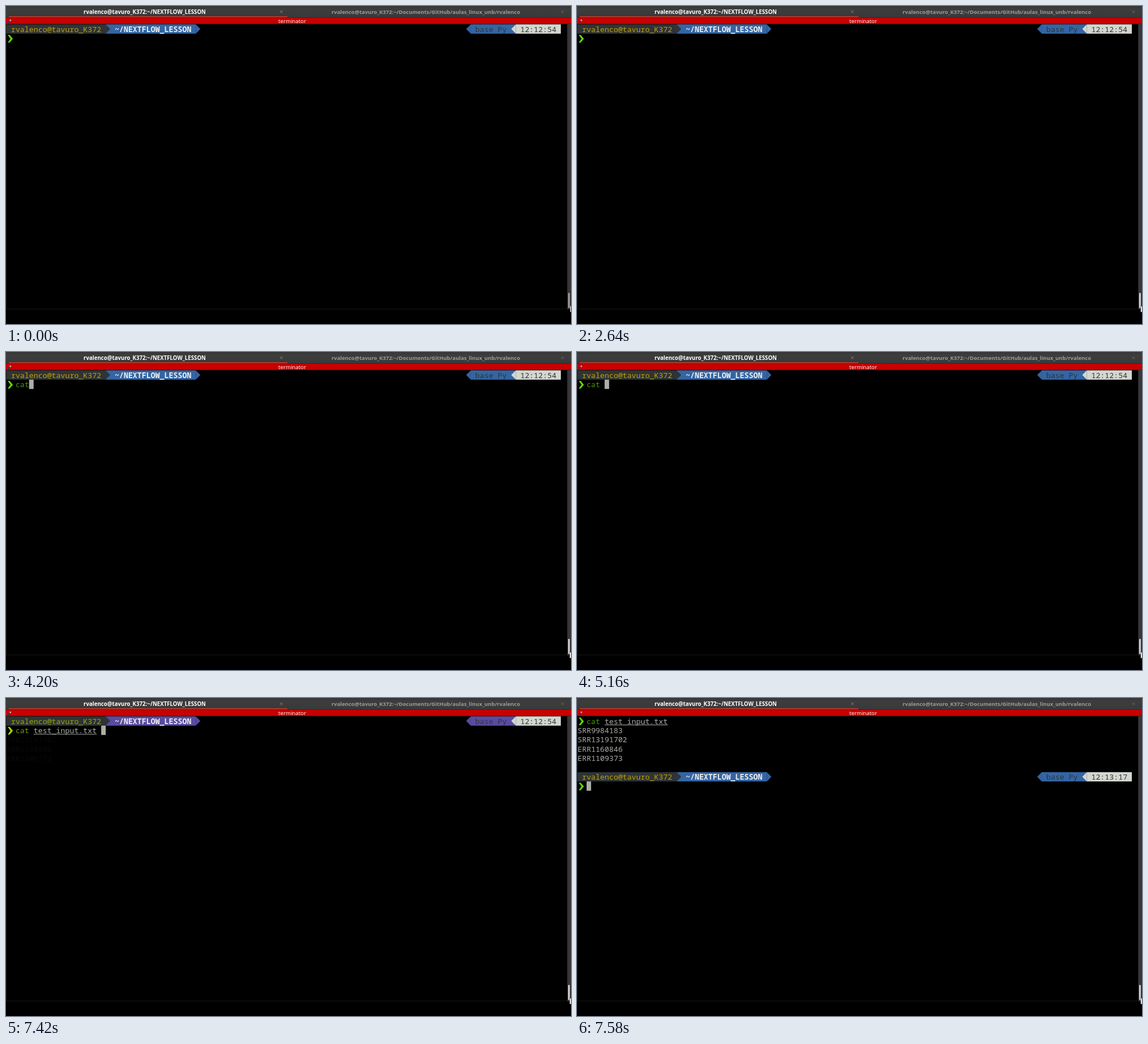
Animation, 998 px wide and 561 px high, one loop 8 s. Source, as an HTML page:

```html
<!DOCTYPE html>
<html lang="en">
<head>
<meta charset="utf-8">
<title>Terminal session</title>
<style>
html, body { margin: 0; width: 100%; height: 100%; overflow: hidden; background: #000; }
svg { display: block; width: 998px; height: 561px; }
text { white-space: pre; }
.mono { font: 13.27px "Noto Sans Mono", monospace; }
.ui { font: 9.7px "Open Sans", "Noto Sans", sans-serif; text-anchor: middle; }
.bold { font-weight: 700; }
</style>
</head>
<body>
<svg viewBox="0 0 998 561">
  <defs>
    <linearGradient id="bar" x2="0" y2="1">
      <stop offset="0" stop-color="#353535"/>
      <stop offset=".25" stop-color="#3d3d3d"/>
      <stop offset="1" stop-color="#393939"/>
    </linearGradient>
  </defs>
  <rect width="998" height="561"/>
  <rect width="998" height="20.5" fill="url(#bar)"/>
  <rect x="5" y="18.2" width="492" height="1.6" fill="#d8382c"/>
  <text class="ui bold" x="245" y="13.5" fill="#fff" id="tab1"></text>
  <text class="ui bold" x="741.5" y="13.5" fill="#9c9c9c" style="font-size:9.45px" id="tab2"></text>
  <path d="M484.2 8l4.4 4.4m0-4.4l-4.4 4.4" stroke="#858585"/>
  <path d="M980.8 8l4.4 4.4m0-4.4l-4.4 4.4" stroke="#666"/>
  <rect y="20.5" width="998" height="11.2" fill="#c80000"/>
  <rect x="3" y="26.5" width="3.2" height="3" fill="#203a60"/>
  <rect x="6.5" y="24" width="2.5" height="2.5" fill="#b8bcc8"/>
  <text class="ui" x="505.5" y="29.6" fill="#fff">terminator</text>
  <path d="M.5 32V534.5H991" fill="none" stroke="#17170a"/>
  <rect x="991.3" y="32" width="6.7" height="503" fill="#37373a"/>
  <rect id="thumb" x="993" y="506" width="2.8" height="27" rx="1.4"/>
  <path id="mouse" d="M996.5 528L999 531V540H996.5Z" fill="#fff" stroke="#111" stroke-width=".5"/>
  <g id="screen"></g>
</svg>
<script>
const LOOP = 8000, CELL = 7.96, ROW = 16.4, LEFT = 1, TOP = 32.4;
const USER = 'rvalenco', HOST = 'tavuro_K372', DIR = '~/NEXTFLOW_LESSON';
const GREY = '#acaea8', GREEN = '#4e9a06', RED = '#ef2929', DARK = '#2e3436';
const FILE = 'test_input.txt';
const IDS = ['SRR9984183', 'SRR13191702', 'ERR1160846', 'ERR1109373'];

const el = id => document.getElementById(id);
const colX = c => LEFT + c * CELL;
const rowY = r => TOP + r * ROW;

el('tab1').textContent = `${USER}@${HOST}:${DIR}`;
el('tab2').textContent = `${USER}@${HOST}:~/Documents/GitHub/aulas_linux_unb/${USER}`;

const text = (c, r, s, fill, bold) =>
  `<text class="mono${bold ? ' bold' : ''}" x="${colX(c)}" y="${rowY(r) + 13.1}" fill="${fill}">${s}</text>`;
const block = (c, r, n, fill) =>
  `<rect x="${colX(c)}" y="${rowY(r)}" width="${n * CELL}" height="${ROW}" fill="${fill}"/>`;
const cursor = (c, r) => block(c, r, 1, GREY);

// Powerline tip in one cell: dir 1 points right, -1 points left
function tip(c, r, dir, fill) {
  const base = colX(dir > 0 ? c : c + 1);
  return `<path d="M${base} ${rowY(r)}l${dir * CELL} ${ROW / 2}l${-dir * CELL} ${ROW / 2}z" fill="${fill}"/>`;
}

const caret = (r, fill = '#5fd700') =>
  `<path d="M3 ${rowY(r) + 2.2}h3.6l5.6 6.7l-5.6 6.7h-3.6l4.9-6.7z" fill="${fill}"/>`;

function header(r, clock, shifted) {
  const blue = shifted ? '#5a4ba0' : '#3465a4';
  return block(0, r, 22, DARK) + block(22, r, 20, blue) + tip(22, r, 1, DARK) + tip(42, r, 1, blue) +
    text(1, r, `${USER}@${HOST}`, shifted ? '#98a800' : '#c4a000') +
    text(24, r, DIR, '#eeeeec', true) +
    tip(102, r, -1, blue) + block(103, r, 10, blue) + text(104, r, 'base Py', DARK) +
    tip(112, r, -1, '#d3d7cf') + block(113, r, 10, '#d3d7cf') + text(114, r, clock, DARK);
}

function command(r, cmd, arg, shifted) {
  const known = cmd === 'cat';
  const color = known ? (shifted ? '#6f9d06' : GREEN) : RED;
  let out = caret(r, shifted ? '#9bd800' : undefined) + text(2, r, cmd, color, !known);
  if (arg) {
    out += text(6, r, arg, GREY) +
      `<rect x="${colX(6)}" y="${rowY(r) + 14.6}" width="${arg.length * CELL}" height="1" fill="${GREY}"/>`;
  }
  return out;
}

const listing = fill => IDS.map((id, i) => text(0, i + 1, id, fill)).join('');

// Typing view; at is the cursor cell, or 0 while it is hidden
const typing = (cmd, arg, at) => () =>
  header(0, '12:12:54') + command(1, cmd, arg) + (at ? cursor(at, 1) : '');

const output = () => command(0, 'cat', FILE) + listing(GREY);
const prompt = () => output() + header(6, '12:13:17') + caret(7);

const STEPS = [
  [0, typing('', '', 0)],
  [960, typing('', '', 2)],
  [2640, typing('', '', 0)],
  [3660, typing('', '', 2)],
  [3780, typing('c', '', 3)],
  [3940, typing('ca', '', 4)],
  [4200, typing('cat', '', 5)],
  [4620, typing('cat', '', 6)],
  [5180, typing('cat', 't', 7)],
  [5340, typing('cat', 'te', 8)],
  [5760, typing('cat', 'tes', 9)],
  [6280, typing('cat', FILE, 21)],
  [7420, () => `<g opacity=".05">${listing(GREY)}</g>` + block(0, 1, 22, '#000') +
    header(0, '12:12:54', true) + command(1, 'cat', FILE, true) + cursor(21, 1)],
  [7440, output],
  [7560, prompt],
  [7580, () => prompt() + cursor(2, 7)]
];

let shown = -1;
function draw(now) {
  const t = now % LOOP;
  const moved = t >= 140;
  el('thumb').setAttribute('fill', moved ? '#dcdcda' : '#a4a4a2');
  el('mouse').setAttribute('transform', moved ? 'translate(-.8 0)' : '');
  const i = STEPS.findLastIndex(([at]) => t >= at);
  if (i !== shown) {
    el('screen').innerHTML = STEPS[i][1]();
    shown = i;
  }
}

const start = performance.now();
function tick() {
  draw(performance.now() - start);
  requestAnimationFrame(tick);
}
tick();
</script>
</body>
</html>
```
